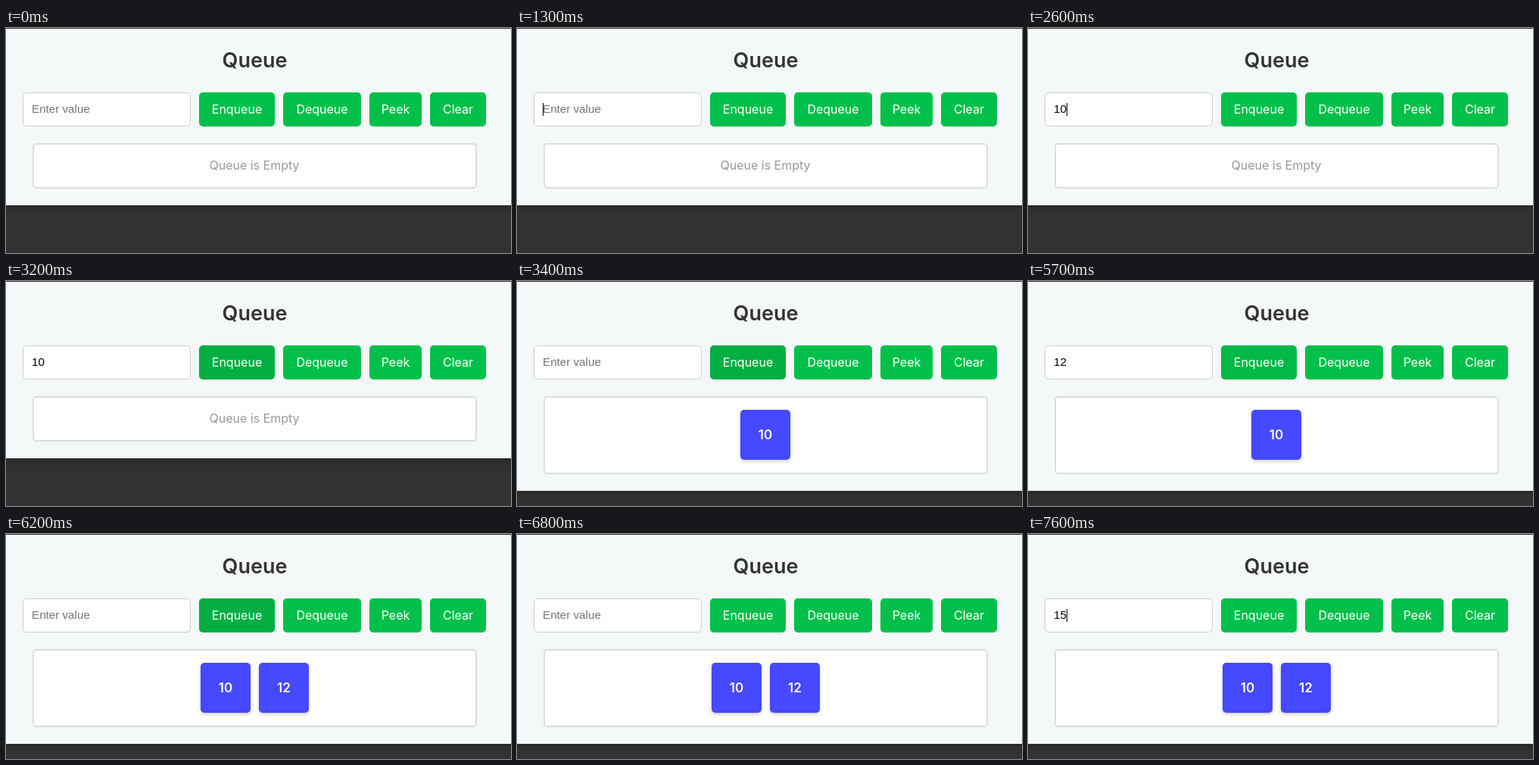
Write an HTML page that moves like this. It is 667x297 px and loops after 8000 ms.

```html
<!DOCTYPE html>
<html lang="en">
<head>
<meta charset="utf-8">
<title>Queue</title>
<style>
  html, body { margin: 0; width: 100%; height: 100%; overflow: hidden; background: #333233; }
  svg { display: block; }
  text { font: 400 16px Poppins, Inter, sans-serif; text-anchor: middle; }
  #panel { fill: #f4f8f9; filter: drop-shadow(0 4px 5px rgba(0, 0, 0, .2)); }
  #title { font-size: 27px; font-weight: 600; fill: #333; }
  #field { font: 15.2px "Liberation Sans", Arial, sans-serif; text-anchor: start; }
  #empty { fill: #999; }
  .button rect { fill: #00c04b; }
  .button text { fill: #fff; }
  .item rect { fill: #4549ff; filter: drop-shadow(0 2px 2px rgba(0, 0, 0, .2)); }
  .item text { font-size: 17px; font-weight: 600; fill: #fff; }
</style>
</head>
<body>
<svg id="stage" width="667" height="297" viewBox="0 0 667 297">
  <rect id="panel" x="-20" y="1" width="707" height="233"/>
  <text id="title" x="328.5" y="52">Queue</text>
  <rect x="22.5" y="85.5" width="221" height="44" rx="5" fill="#fff" stroke="#ccc"/>
  <text id="field" x="34" y="112"></text>
  <rect id="caret" y="99" width="1" height="17"/>
  <rect id="box" x="36" y="153" width="585" height="58" rx="4" fill="#fff" stroke="#ddd" stroke-width="2"/>
  <text id="empty" x="328" y="187">Queue is Empty</text>
</svg>
<script>
const LOOP = 8000;
const $ = id => document.getElementById(id);
const stage = $("stage");

// A rounded tile with a centred label
function tile(kind, label, x, y, w, h, base) {
  const g = document.createElementNS("http://www.w3.org/2000/svg", "g");
  g.setAttribute("class", kind);
  g.innerHTML = `<rect x="${x}" y="${y}" width="${w}" height="${h}" rx="5"/>
    <text x="${x + w / 2}" y="${base}">${label}</text>`;
  stage.append(g);
  return g;
}

const button = (label, x, w) => tile("button", label, x, 85, w, 45, 113);
const item = label => tile("item", label, 0, 170, 66, 66, 209);

const enqueue = button("Enqueue", 255, 100).firstChild;
button("Dequeue", 366, 103);
button("Peek", 480, 69);
button("Clear", 560, 74);
const items = [item(10), item(12)];

const typed = [[0, ""], [2100, "10"], [3400, ""], [4700, "12"], [6200, ""], [7500, "1"], [7600, "15"]];
const carets = [[1300, 1900], [2100, 2800], [4100, 5300], [6900, LOOP]];
const hovers = [[2800, 3700], [5620, 6550]];

const ease = p => 1 - (1 - Math.min(1, Math.max(0, p))) ** 2;
const within = t => ([from, to]) => t >= from && t < to;

function draw(t) {
  const value = typed.filter(([at]) => at <= t).pop()[1];
  const field = $("field");
  if (field.textContent !== (value || "Enter value")) field.textContent = value || "Enter value";
  field.setAttribute("fill", value ? "#000" : "#757575");

  $("caret").setAttribute("x", 34 + Math.round(value.length * 8.45));
  $("caret").style.display = carets.some(within(t)) ? "" : "none";

  const hover = hovers.reduce((sum, [on, off]) => sum + ease((t - on) / 300) - ease((t - off) / 300), 0);
  enqueue.style.fill = `rgb(${4 * hover}, ${192 - 18 * hover}, ${75 - 9 * hover})`;

  const count = t < 3400 ? 0 : t < 6200 ? 1 : 2;
  const grow = count ? 43 : 0;
  $("panel").setAttribute("height", 233 + grow);
  $("box").setAttribute("height", 58 + grow);
  $("empty").style.display = count ? "none" : "";
  items.forEach((el, i) => {
    el.style.display = i < count ? "" : "none";
    el.setAttribute("transform", `translate(${(count === 1 ? 295 : 257) + 77 * i})`);
  });
}

function tick(now) {
  draw(now % LOOP);
  requestAnimationFrame(tick);
}
draw(0);
requestAnimationFrame(tick);
</script>
</body>
</html>
```
